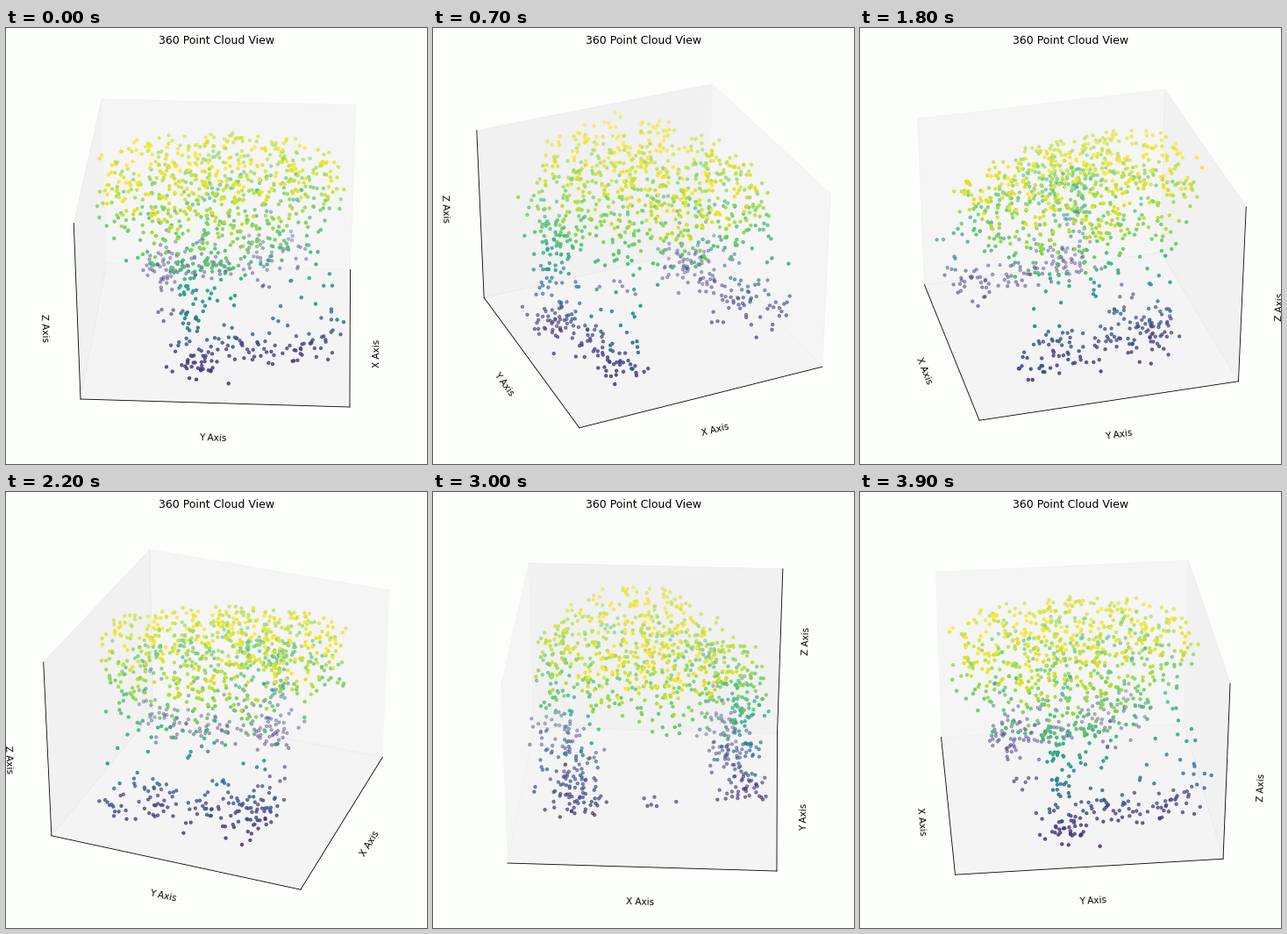
These frames come from a looping animation (480x497 px, 4000 ms). A matplotlib script:

```python
import numpy as np
import matplotlib.pyplot as plt
from matplotlib.animation import FuncAnimation

W, H, DPI = 480, 497, 75
FRAMES, INTERVAL = 40, 100
BACKGROUND = "#fcfefc"
TOP = 0.96

rng = np.random.default_rng(12)


def canopy(n):
    """Rounded, slightly arched slab of foliage with one corner cut off."""
    angle = rng.uniform(0, 2 * np.pi, n)
    radius = 0.92 * rng.random(n) ** 0.55 + rng.normal(0, 0.03, n)
    x, y = radius * np.cos(angle), radius * np.sin(angle)
    slope = 0.3 * x**2 + 0.12 * np.maximum(x + y, 0) ** 2
    z = TOP - slope - 0.58 * rng.random(n) ** 1.5
    keep = (x + y < 1.02) & (x > -0.84)
    return np.column_stack([x, y, z])[keep]


def strip(n, knots, z, spread=0.1):
    """Points scattered along a ground line given by (y, x) knots."""
    ys, xs = zip(*knots)
    y = rng.uniform(ys[0], ys[-1], n)
    x = np.interp(y, ys, xs) + rng.normal(0, spread, n)
    return np.column_stack([x, y, z])


def column(n, x, y, low, high, spread):
    z = rng.uniform(low, high, n)
    return np.column_stack([rng.normal(x, spread, n), rng.normal(y, spread, n), z])


FRONT = [(-0.28, 0.78), (0.38, 0.57), (0.94, 0.52)]
BACK = [(-0.62, -0.52), (0.12, -0.62), (0.66, -0.82)]

points = np.vstack([
    canopy(760),
    strip(95, FRONT, rng.normal(-0.7, 0.09, 95)),
    strip(100, BACK, rng.normal(-0.64, 0.12, 100), 0.12),
    strip(38, FRONT, rng.uniform(-0.5, 0.4, 38)),
    strip(38, BACK, rng.uniform(-0.45, 0.4, 38)),
    column(50, 0.73, -0.16, -0.85, 0.4, 0.07),
    column(36, -0.55, -0.45, -0.8, -0.5, 0.11),
    strip(12, [(-0.5, -0.1), (-0.3, 0.3)], rng.normal(-0.74, 0.05, 12), 0.3),
])
points = np.clip(points, -TOP, TOP)

fig = plt.figure(figsize=(W / DPI, H / DPI), dpi=DPI, facecolor=BACKGROUND)
side = 463.8
ax = fig.add_axes([7.9 / W, 7.9 / H, side / W, side / H], projection="3d",
                  facecolor=BACKGROUND)
# Leaving alpha unset keeps the depth fading of far points.
ax.scatter(*points.T, c=points[:, 2], cmap="viridis", vmin=-1.05, vmax=0.93, s=10)
ax.set_title("360 Point Cloud View", fontsize=12, pad=7)
ax.set(xlim=(-1, 1), ylim=(-1, 1), zlim=(-1, 1),
       xticks=[], yticks=[], zticks=[],
       xlabel="X Axis", ylabel="Y Axis", zlabel="Z Axis")
ax.xaxis.set_pane_color((0.93, 0.93, 0.93, 0.5))
ax.grid(False)


def update(i):
    ax.view_init(elev=30, azim=3 + i * 360 / FRAMES)
    return ()


anim = FuncAnimation(fig, update, frames=FRAMES, interval=INTERVAL,
                     repeat=True, repeat_delay=0)
plt.show()
```
